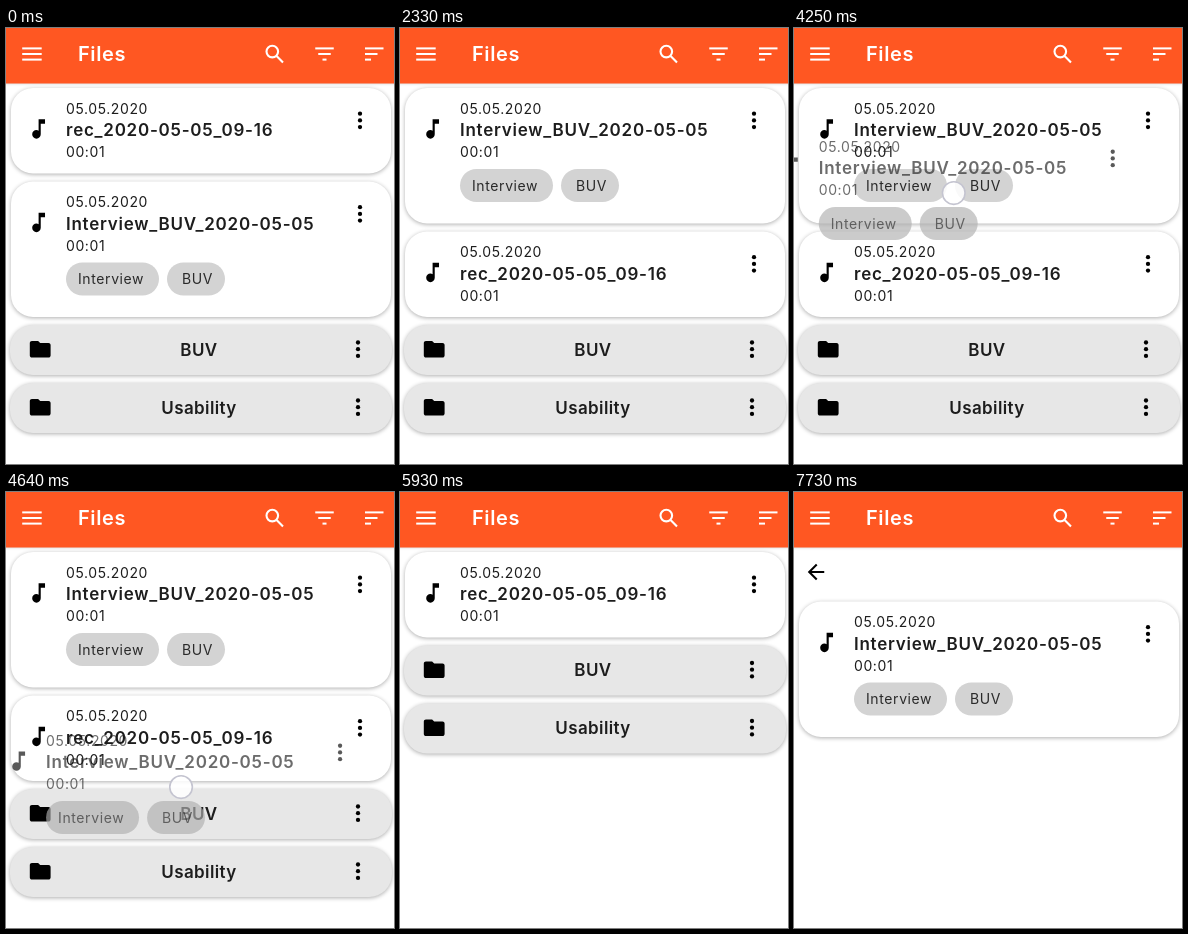
An HTML page with a canvas that plays this animation: 388x436 px, repeating every 8 s.

```html
<!DOCTYPE html>
<html lang="en">
<head>
<meta charset="utf-8">
<title>File list</title>
<style>
  html, body { margin: 0; width: 100%; height: 100%; overflow: hidden; background: #fff; }
  canvas { display: block; width: 388px; height: 436px; }
</style>
</head>
<body>
<canvas id="stage"></canvas>
<script>
const W = 388, H = 436, LOOP = 8000;
const FONT = 'Inter, Roboto, sans-serif';
const INK = '#1d1d1d';
const canvas = document.getElementById('stage');
const ctx = canvas.getContext('2d');
const dpr = window.devicePixelRatio || 1;
canvas.width = W * dpr;
canvas.height = H * dpr;

const ICONS = {
  note: new Path2D('M12 3v10.55c-.59-.34-1.27-.55-2-.55-2.21 0-4 1.79-4 4s1.79 4 4 4 4-1.79 4-4V7h4V3z'),
  folder: new Path2D('M10 4H4c-1.1 0-2 .9-2 2v12c0 1.1.9 2 2 2h16c1.1 0 2-.9 2-2V8c0-1.1-.9-2-2-2h-8z'),
  back: new Path2D('M20 11H7.83l5.59-5.59L12 4l-8 8 8 8 1.41-1.41L7.83 13H20z')
};

const clamp = v => Math.max(0, Math.min(1, v));
const span = (t, a, b) => clamp((t - a) / (b - a));
const ease = u => (1 - Math.cos(Math.PI * u)) / 2;
const mix = (a, b, u) => a + (b - a) * u;
// Rises over a..b, falls over c..d.
const pulse = (t, a, b, c, d) => span(t, a, b) * (1 - span(t, c, d));

function withAlpha(alpha, draw) {
  if (alpha <= 0) return;
  ctx.save();
  ctx.globalAlpha *= alpha;
  draw();
  ctx.restore();
}

function text(str, x, y, size, weight, spacing, color = INK, align = 'left') {
  ctx.font = `${weight} ${size}px ${FONT}`;
  ctx.letterSpacing = spacing + 'px';
  ctx.textAlign = align;
  ctx.fillStyle = color;
  ctx.fillText(str, x, y);
}

function box(x, y, w, h, r, fill) {
  ctx.beginPath();
  ctx.roundRect(x, y, w, h, r);
  ctx.fillStyle = fill;
  ctx.fill();
}

function raised(x, y, w, h, r, fill, blur = 4, shade = 0.32) {
  ctx.save();
  ctx.shadowColor = `rgba(0,0,0,${shade})`;
  ctx.shadowBlur = blur * dpr;
  ctx.shadowOffsetY = dpr;
  box(x, y, w, h, r, fill);
  ctx.restore();
}

function icon(name, cx, cy, scale) {
  ctx.save();
  ctx.translate(cx, cy);
  ctx.scale(scale, scale);
  ctx.translate(-12, -12);
  ctx.fillStyle = '#000';
  ctx.fill(ICONS[name]);
  ctx.restore();
}

function dots(x, y) {
  ctx.fillStyle = '#000';
  for (const dy of [-6.7, 0, 6.7]) {
    ctx.beginPath();
    ctx.arc(x, y + dy, 2.15, 0, 7);
    ctx.fill();
  }
}

function chip(label, x, y, w, pad, fill) {
  box(x, y, w, 33, 16.5, fill);
  text(label, x + pad, y + 21.5, 14, 400, 0.6, '#2a2a2a');
}

function fileBody(file, y, chipFill = '#d3d3d3') {
  icon('note', 32.6, y + 41, 1.07);
  text('05.05.2020', 60, y + 25.5, 14, 400, 0.6);
  text(file.name, 60, y + 48, 17, 600, 0.75);
  text('00:01', 60, y + 69, 14, 400, 0.6);
  dots(354, y + 32.4);
  if (file.tagged) {
    chip('Interview', 60, y + 81, 93, 12, chipFill);
    chip('BUV', 161, y + 81, 58, 15, chipFill);
  }
}

const REC = { name: 'rec_2020-05-05_09-16', h: 85.5 };
const TALK = { name: 'Interview_BUV_2020-05-05', h: 135.5, tagged: true };

function fileCard(file, y, alpha = 1) {
  withAlpha(alpha, () => {
    raised(5, y, 380, file.h, 22, '#fff');
    fileBody(file, y);
  });
}

function folderCard(name, y, alpha = 1) {
  withAlpha(alpha, () => {
    raised(4, y, 382, 50, 23, '#e7e7e7');
    icon('folder', 34.2, y + 24.2, 1.04);
    text(name, 193, y + 30.5, 17, 600, 0.4, INK, 'center');
    dots(352, y + 24.2);
  });
}

function bars(widths, x, centered) {
  widths.forEach((w, i) => ctx.fillRect(centered ? x - w / 2 : x, 19.4 + i * 5.6, w, 2));
}

function header() {
  raised(-10, -10, W + 20, 65.4, 0, '#ff5722', 3, 0.22);
  ctx.fillStyle = '#fff';
  bars([19.5, 19.5, 19.5], 16.2);
  bars([18.5, 12.5, 4], 318.5, true);
  bars([18.5, 12.5, 6], 359);
  text('Files', 72, 33, 20, 600, 0.6, '#fff');
  ctx.strokeStyle = '#fff';
  ctx.lineWidth = 2.1;
  ctx.beginPath();
  ctx.arc(266.3, 23.6, 5.8, 0, 7);
  ctx.moveTo(270.6, 28);
  ctx.lineTo(277, 34.5);
  ctx.stroke();
}

function sortMenu(t) {
  const open = ease(span(t, 610, 860));
  const alpha = open * (1 - span(t, 1570, 1730));
  if (alpha <= 0) return;
  const w = 197 * mix(0.35, 1, open), h = 165 * mix(0.25, 1, open);
  withAlpha(alpha, () => {
    raised(388 - w, 2, w, h, 2, '#fff', 8, 0.4);
    ctx.beginPath();
    ctx.rect(388 - w, 2, w, h);
    ctx.clip();
    ['Name', 'Date', 'Duration'].forEach((s, i) => text(s, 208, 41 + i * 49.5, 16, 400, 0));
  });
}

function touch(x, y, alpha) {
  withAlpha(alpha, () => {
    ctx.beginPath();
    ctx.arc(x, y, 11.3, 0, 7);
    ctx.fillStyle = 'rgba(255,255,255,.85)';
    ctx.fill();
    ctx.strokeStyle = '#c4c4d0';
    ctx.lineWidth = 1.6;
    ctx.stroke();
  });
}

function list(t) {
  const swap = ease(span(t, 1650, 1900));
  const close = ease(span(t, 5330, 5590));
  const leave = 1 - span(t, 7140, 7260);
  const lift = 143.5 * close;
  fileCard(REC, mix(60, 203.5, swap) - lift, leave);
  folderCard('BUV', 297 - lift, leave);
  folderCard('Usability', 355 - lift, leave);
  fileCard(TALK, mix(153.5, 60, swap), 1 - span(t, 5200, 5330));

  const enter = span(t, 7250, 7390);
  withAlpha(enter, () => icon('back', 22, 80, 1.03));
  fileCard(TALK, 109.5, enter);
}

function drag(t) {
  if (t >= 5030) return;
  const e = ease(span(t, 3920, 4850));
  const x = 158 + 22 * e * e, y = 104 + 217 * e;
  withAlpha(0.65 * span(t, 3560, 3640), () => {
    ctx.translate(x - 195, y - 127);
    fileBody(TALK, 60, '#afafaf');
  });
  touch(x, y, span(t, 3170, 3320) * mix(0.65, 1, span(t, 3950, 4150)));
}

function draw(t) {
  ctx.setTransform(dpr, 0, 0, dpr, 0, 0);
  ctx.fillStyle = '#fff';
  ctx.fillRect(0, 0, W, H);
  list(t);
  header();
  sortMenu(t);
  drag(t);
  touch(368, 26, pulse(t, 500, 550, 590, 680));
  touch(232, 36, pulse(t, 1440, 1500, 1560, 1650));
  touch(193, 178, pulse(t, 7040, 7090, 7130, 7220));
}

const start = performance.now();
function frame() {
  draw((performance.now() - start) % LOOP);
  requestAnimationFrame(frame);
}
frame();
</script>
</body>
</html>
```
